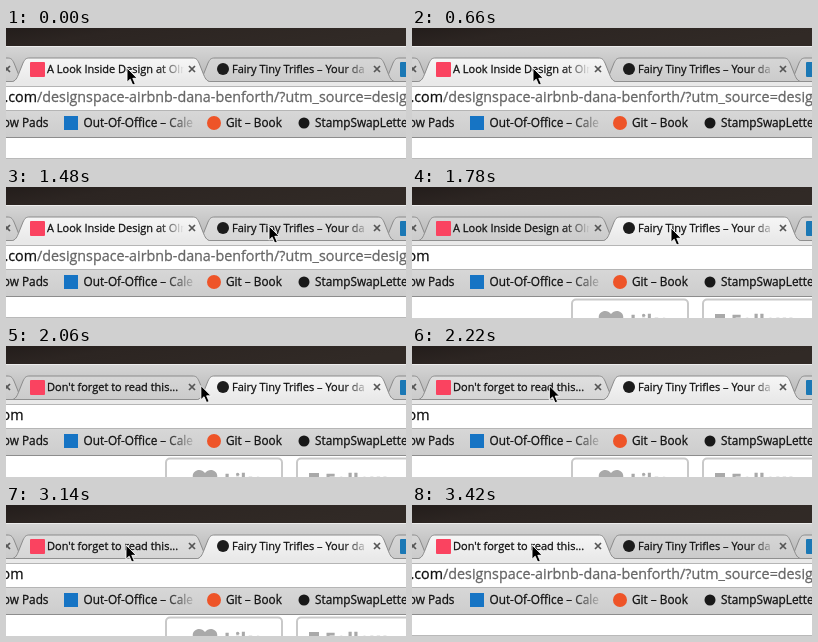
An HTML page that plays this animation: 400 by 131 pixels, repeating every 3440 ms.

```html
<!DOCTYPE html>
<html lang="en">
<head>
<meta charset="utf-8">
<title>Tab title reminder</title>
<style>
  html, body { margin: 0; width: 100%; height: 100%; overflow: hidden; }
  svg { display: block; width: 400px; height: 131px; cursor: default; }
  text, tspan { fill: var(--ink, #111); stroke: var(--ink, #111); stroke-width: .28px; }
  text { font: 500 11px "Open Sans", "Noto Sans", sans-serif; white-space: pre; }
  .mark text { font-size: 11.8px; }
  .url text { font-size: 14.3px; font-weight: 400; }
  .page text { font-size: 19px; font-weight: 700; --ink: #a9a9a9; }
  .shape { stroke: #8b8b8b; fill: url(#idle); }
  .hover .shape { fill: url(#warm); }
  .active .shape { fill: url(#front); }
  .cross { stroke: #555; stroke-width: 1.7; fill: none; }
  .disc { fill: none; }
  .closing .disc { fill: #e88573; }
  .closing .cross { stroke: #fff; }
</style>
</head>
<body>
<svg viewBox="0 0 400 131">
  <defs>
    <linearGradient id="wall" x2="1" y2=".3">
      <stop stop-color="#231d1b"/><stop offset=".3" stop-color="#2c2522"/><stop offset="1" stop-color="#312a26"/>
    </linearGradient>
    <linearGradient id="strip" x2="0" y2="1"><stop stop-color="#d6d6d6"/><stop offset="1" stop-color="#b4b4b4"/></linearGradient>
    <linearGradient id="idle" x2="0" y2="1"><stop stop-color="#d6d6d6"/><stop offset="1" stop-color="#cbcbcb"/></linearGradient>
    <linearGradient id="warm" x2="0" y2="1"><stop stop-color="#dfdfdf"/><stop offset="1" stop-color="#d5d5d5"/></linearGradient>
    <linearGradient id="front" x2="0" y2="1"><stop stop-color="#f6f6f6"/><stop offset="1" stop-color="#e9e9e9"/></linearGradient>
    <linearGradient id="bar" x2="0" y2="1"><stop stop-color="#e2e2e2"/><stop offset="1" stop-color="#cdcdcd"/></linearGradient>
    <linearGradient id="titleFade" gradientUnits="userSpaceOnUse" x1="150" x2="178">
      <stop stop-color="#111"/><stop offset="1" stop-color="#111" stop-opacity="0"/>
    </linearGradient>
    <linearGradient id="markFade" gradientUnits="userSpaceOnUse" x1="155" x2="191">
      <stop stop-color="#111"/><stop offset="1" stop-color="#111" stop-opacity="0"/>
    </linearGradient>
  </defs>

  <rect width="400" height="131" fill="#fff"/>
  <rect width="400" height="19" fill="url(#wall)"/>
  <rect y="18" width="400" height="36" fill="url(#strip)"/>
  <path d="M0 18.5H400" stroke="#ececec"/>
  <g id="tabs"><path id="edge" d="M0 53.5H400" stroke="#8f8f8f"/></g>

  <rect y="54" width="400" height="55" fill="url(#bar)"/>
  <rect y="54" width="400" height="5" fill="#e9e9e9"/>
  <path d="M0 58.5H400M0 82.5H400" stroke="#b5b5b5"/>
  <rect y="59" width="400" height="23" fill="#fff"/>
  <path d="M0 109.5H400" stroke="#8d8d8d"/>

  <g class="url" id="article">
    <text x="-1.5" y="74">.com<tspan style="--ink:#666">/designspace-airbnb-dana-benforth/?utm_source=design</tspan></text>
    <path d="M0 130.5H400" stroke="#b9b9b9"/>
  </g>
  <g id="blog">
    <g class="url"><text x="17.5" y="74" text-anchor="end">com</text></g>
    <g class="page">
      <rect x="160" y="112.5" width="116" height="40" rx="4" fill="#fff" stroke="#c9c9c9" stroke-width="2"/>
      <rect x="291" y="112.5" width="116" height="40" rx="4" fill="#fff" stroke="#c9c9c9" stroke-width="2"/>
      <path d="M199 145L188 134C183 126 194 120 199 127C204 120 215 126 210 134Z" fill="#a9a9a9"/>
      <text x="218" y="142">Like</text>
      <path d="M303 127H313V140H303Z" fill="#a9a9a9"/>
      <text x="319" y="142">Follow</text>
    </g>
  </g>

  <g class="mark">
    <text x="42.5" y="99" text-anchor="end">row Pads</text>
    <rect x="58" y="88" width="14" height="14" fill="#1674c4"/>
    <text x="77.5" y="99" style="--ink:url(#markFade)">Out-Of-Office – Cale</text>
    <circle cx="208" cy="95" r="7" fill="#ee5428"/>
    <text x="220" y="99">Git – Book</text>
    <circle cx="298" cy="95" r="5.5" fill="#181818"/>
    <text x="309" y="99">StampSwapLetters</text>
  </g>

  <path id="pointer" d="M0 0V14.2L3.2 11.2L5.7 17L8.3 15.9L5.8 10.3H10.2Z" fill="#000" stroke="#fff" stroke-width=".9"/>
</svg>

<script>
const LOOP = 3440, PITCH = 185;
const LEAVE = 1700, REMIND = 1980, RETURN = 3320, HOVER_LAG = 40;

// time, x, y, downward bow on the way here
const path = [
  [0, 121, 40, 0], [674, 121, 40, 0], [1234, 263, 39, 3], [1560, 263, 39, 0],
  [1700, 259, 41, 0], [1815, 259, 41, 0], [2330, 121.5, 40, -1], [3000, 120, 40, 0], [LOOP, 120, 40, 0]
];

const $ = id => document.getElementById(id);
const tabs = $('tabs'), edge = $('edge'), pointer = $('pointer');

function addTab(index, icon, title) {
  const tab = document.createElementNS('http://www.w3.org/2000/svg', 'g');
  tab.setAttribute('transform', `translate(${(index - 1) * PITCH})`);
  tab.innerHTML = `
    <path class="shape" d="M5 54C10 53 11 50 13 45L17 35C19 31 20 30 24 30H186C190 30 191 31 193 35L197 45C199 50 200 53 205 54"/>
    ${icon}<text x="41" y="45" style="--ink:url(#titleFade)">${title}</text>
    <circle class="disc" cx="186" cy="41" r="6.8"/>
    <path class="cross" d="M183 38l6 6m0-6l-6 6"/>`;
  tabs.insertBefore(tab, edge);
  return tab;
}

const square = color => `<rect x="24" y="34" width="15" height="15" rx="1" fill="${color}"/>`;
addTab(3, square('#1b78b5'), '');
addTab(0, '', '');
const blogTab = addTab(2, '<circle cx="32" cy="41" r="6" fill="#1c1c1c"/>', 'Fairy Tiny Trifles – Your da');
const articleTab = addTab(1, square('#fa4360'), 'A Look Inside Design at Olm');
const articleTitle = articleTab.querySelector('text');

function pointerAt(t) {
  const i = Math.max(1, path.findIndex(p => p[0] >= t));
  const [t0, x0, y0] = path[i - 1], [t1, x1, y1, bow] = path[i];
  const u = Math.max(0, (t - t0) / (t1 - t0)), s = u * u * (3 - 2 * u);
  return [x0 + (x1 - x0) * s, y0 + (y1 - y0) * s + bow * Math.sin(Math.PI * s)];
}

function setTitle(text, ink) {
  if (articleTitle.textContent === text) return;
  articleTitle.textContent = text;
  articleTitle.style.setProperty('--ink', ink);
}

function draw(now) {
  const t = now % LOOP;
  const [x, y] = pointerAt(t), [hoverX] = pointerAt(Math.max(0, t - HOVER_LAG));
  const away = t >= LEAVE && t < RETURN;
  const front = away ? blogTab : articleTab;

  pointer.setAttribute('transform', `translate(${x} ${y})`);
  if (tabs.lastChild !== front) tabs.append(edge, front);
  articleTab.classList.toggle('active', !away);
  blogTab.classList.toggle('active', away);
  articleTab.classList.toggle('hover', hoverX < 200);
  blogTab.classList.toggle('hover', hoverX >= 200);
  articleTab.classList.toggle('closing', Math.abs(hoverX - 186) < 9);
  $('article').style.display = away ? 'none' : '';
  $('blog').style.display = away ? '' : 'none';

  if (t < REMIND) setTitle('A Look Inside Design at Olm', 'url(#titleFade)');
  else setTitle("Don't forget to read this...", '#111');

  requestAnimationFrame(draw);
}
draw(0);
</script>
</body>
</html>
```
